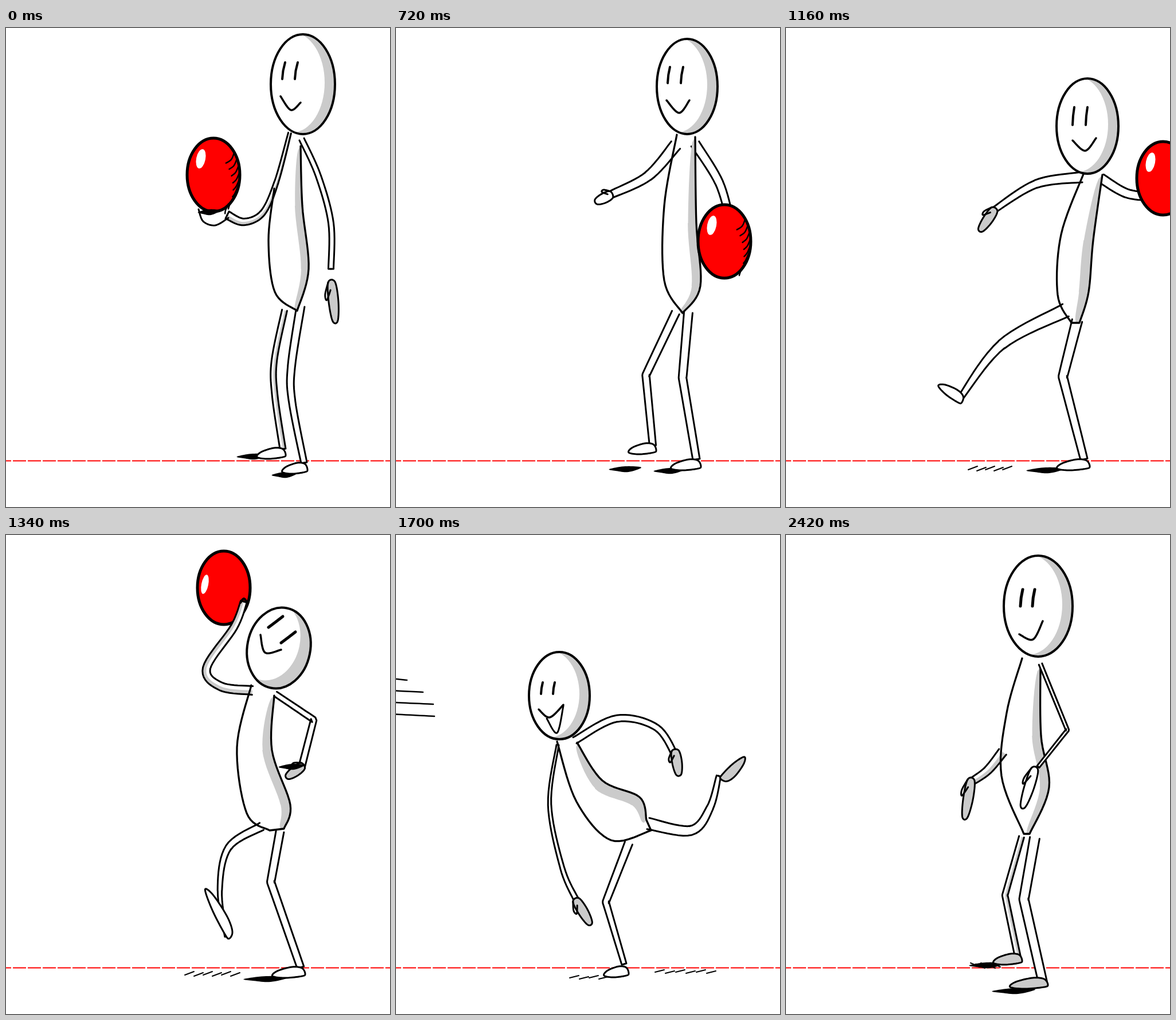
Write an HTML page with a canvas that moves like this. It is 670x835 px and loops after 2900 ms.

```html
<!DOCTYPE html>
<html lang="en">
<head>
<meta charset="utf-8">
<title>Ball throw</title>
<style>
html, body { margin: 0; width: 100%; height: 100%; overflow: hidden; background: #fff; }
canvas { display: block; width: 100%; height: 100%; }
</style>
</head>
<body>
<canvas id="stage" width="670" height="835"></canvas>
<script>
const c = document.getElementById('stage').getContext('2d');
const GRAY = '#cbcbcb', WHITE = '#fff', INK = '#000';
const LOOP = 2900;
c.lineCap = c.lineJoin = 'round';

// "x y x y ..." to points; "!" after a point makes it a corner.
function parse(str) {
  const v = str.split(' '), p = [];
  for (let i = 0; i < v.length; i += 2) {
    const q = [parseFloat(v[i]), parseFloat(v[i + 1])];
    p.push(q);
    if (v[i + 1].endsWith('!')) p.push(q);
  }
  return p;
}

// Points along a smooth curve through p.
function curve(p, closed) {
  const m = p.length, out = [];
  const at = i => closed ? p[(i + m) % m] : p[Math.max(0, Math.min(m - 1, i))];
  for (let i = 0; i < (closed ? m : m - 1); i++) {
    const [a, b, d, e] = [at(i - 1), at(i), at(i + 1), at(i + 2)];
    if (b === d) continue;
    for (let u = 0; u < 1; u += .1) {
      out.push([0, 1].map(k => b[k] + u * (d[k] - a[k] + u * (2 * a[k] - 5 * b[k] + 4 * d[k] - e[k]
        + u * (3 * (b[k] - d[k]) + e[k] - a[k]))) / 2));
    }
  }
  if (!closed) out.push(p[m - 1]);
  return out;
}

function path(pts) {
  c.beginPath();
  pts.forEach(q => c.lineTo(...q));
}
function pen(w = 3) {
  c.lineWidth = w;
  c.strokeStyle = INK;
  c.stroke();
}
function paint(color) {
  c.fillStyle = color;
  c.fill();
}
function line(str, w) {
  path(curve(parse(str)));
  pen(w);
}
function loop(pts, color, w) {
  path(curve(pts, true));
  c.closePath();
  paint(color);
  if (w) pen(w);
}

// Moves local points to x, y, turned by deg.
function place(pts, x, y, deg = 0) {
  const a = deg * Math.PI / 180, s = Math.sin(a), k = Math.cos(a);
  return pts.map(([u, v]) => [x + u * k - v * s, y + u * s + v * k]);
}

// Two ink lines on both sides of a middle line.
function limb(str, w0, w1, shade) {
  const mid = curve(parse(str)), n = mid.length - 1;
  const side = sign => mid.map(([x, y], i) => {
    const a = mid[Math.max(0, i - 1)], b = mid[Math.min(n, i + 1)];
    const dx = b[0] - a[0], dy = b[1] - a[1];
    const r = sign * (w0 + (w1 - w0) * i / n) / 2 / (Math.hypot(dx, dy) || 1);
    return [x - dy * r, y + dx * r];
  });
  const left = side(1), right = side(-1);
  path([...left, ...right.slice().reverse()]);
  paint(WHITE);
  if (shade) {
    path([...mid, ...right.slice().reverse()]);
    paint(GRAY);
  }
  path(left);
  pen();
  path(right);
  pen();
}

function hand(x, y, deg, len, color = GRAY) {
  loop(place([[0, -6], [len / 2, -9], [len, -5], [len, 4], [len / 2, 8], [0, 6]], x, y, deg), color, 3);
  path(curve(place([[0, 6], [len * .3, 13], [len * .45, 11], [len * .2, 3]], x, y, deg)));
  pen();
}

// x, y is the heel, the toe points left before turning.
function foot(x, y, len, deg = 0, color = WHITE) {
  loop(place([[0, -4], [-len * .1, 0], [-len * .6, 3], [-len, 0], [-len * .85, -9], [-len * .4, -16], [-len * .1, -14]],
    x, y, deg), color, 3);
}

// Body between a front and a back outline, shaded along the back.
function torso(front, back, sx, sy = 0) {
  const a = curve(parse(front)), b = curve(parse(back)), n = b.length - 1;
  path([...b, ...b.map(([x, y], i) => {
    const k = Math.sqrt(Math.sin(Math.PI * i / n));
    return [x - sx * k, y + sy * k];
  }).reverse()]);
  paint(GRAY);
  path([...a, ...b.slice().reverse()]);
  pen(3.3);
}

function head(x, y, rx, ry, rot = 0, dy = -3) {
  const oval = (ox, oy) => c.ellipse(x + ox, y + oy, rx, ry, rot, 0, Math.PI * 2);
  c.beginPath();
  oval(0, 0);
  paint(WHITE);
  c.save();
  c.clip();
  c.beginPath();
  c.rect(x - ry, y - ry, ry * 2, ry * 2);
  oval(-18, dy);
  c.fillStyle = GRAY;
  c.fill('evenodd');
  c.restore();
  c.beginPath();
  oval(0, 0);
  pen(4);
}

function face(x, y, slant, len, gap, smile, w = 4) {
  for (const ex of [x, x + gap]) {
    path([[ex, y], [ex + slant * .7, y + len / 2], [ex + slant, y + len]]);
    pen(w);
  }
  line(smile, 3.5);
}

function ball(x, y, hatch, sx = -22, sy = -28, sw = 8) {
  c.beginPath();
  c.ellipse(x, y, 46, 64, 0, 0, Math.PI * 2);
  paint('#f00');
  pen(5);
  c.beginPath();
  c.ellipse(x + sx, y + sy, sw, 17, .2, 0, Math.PI * 2);
  paint(WHITE);
  for (let i = 0; i < hatch; i++) {
    const a = i * .2 - .65, hx = x + 45 * Math.cos(a), hy = y + 62 * Math.sin(a);
    path(curve([[hx, hy], [hx - 5, hy + 11], [hx - 14 + i, hy + 17]]));
    pen(2.5);
  }
}

function blot(x, y, w) {
  loop([[x, y], [x + w / 2, y - 5], [x + w, y - 3], [x + w * .6, y + 5], [x + w * .2, y + 3]], INK);
}
function scribble(x, y, n, step, rise = -6) {
  for (let i = 0; i < n; i++) {
    const sx = x + i * step, sy = y + i % 2 * 2;
    path([[sx, sy], [sx + 16, sy + rise]]);
    pen(2);
  }
}

function floor() {
  c.strokeStyle = '#f00';
  c.lineWidth = 2;
  c.lineCap = 'butt';
  c.setLineDash([23, 3]);
  c.lineDashOffset = 14;
  c.beginPath();
  c.moveTo(0, 754.5);
  c.lineTo(670, 754.5);
  c.stroke();
  c.setLineDash([]);
  c.lineCap = 'round';
}

function present() {
  blot(403, 747, 55);
  blot(464, 779, 44);
  limb('486 492 468 580 469 640 483 734', 9, 10, 1);
  limb('514 485 498 590 499 650 520 758', 14, 10);
  foot(488, 748, 50);
  foot(526, 774, 44);
  limb('495 183 472 268 448 322 415 338 386 326', 5, 14, 1);
  limb('516 194 545 258 567 340 567 420', 9, 9);
  hand(568, 443, 85, 68);
  torso('468 280 458 370 469 460 508 493', '514 206 517 310 528 420 508 493', 14);
  line('336 316 344 337 365 344 388 331');
  ball(362, 256, 9);
  blot(335, 321, 38);
  head(518, 98, 56, 87);
  face(487, 60, -5, 29, 22, '479 119 497 143 514 130');
}

function crouch() {
  blot(398, 745, 80);
  blot(465, 771, 37);
  limb('467 518 441 607! 479 735', 15, 10);
  limb('490 519 478 607! 525 754', 12, 12);
  foot(485, 741, 48, 0, GRAY);
  foot(531, 764, 48, 0, GRAY);
  limb('414 264 400 350 376 388 348 350', 4, 14);
  limb('455 260 505 306 538 350 538 430', 20, 10);
  hand(538, 441, 75, 58, WHITE);
  torso('416 262 411 380 436 480 482 521', '454 262 470 370 506 460 497 518', 12);
  line('301 333 303 354 320 366 343 350');
  ball(329, 277, 8);
  head(429, 177, 56, 83, .05, -9);
  face(401, 135, -6, 25, 20, '390 196 410 215 434 193');
}

function reach() {
  blot(372, 769, 56);
  blot(450, 772, 54);
  limb('488 496 436 605! 448 728', 14, 11);
  limb('510 496 500 610! 524 752', 15, 12);
  foot(454, 740, 48);
  foot(532, 768, 52);
  limb('488 204 440 258 376 290', 20, 12);
  hand(376, 290, 155, 30, WHITE);
  limb('522 202 564 270 584 340', 16, 12);
  torso('490 186 468 310 468 440 500 497', '522 190 524 340 531 450 500 497', 16);
  ball(573, 372, 8);
  head(508, 102, 53, 83);
  face(478, 68, -4, 28, 23, '472 126 494 148 512 126');
}

function windup() {
  blot(336, 772, 44);
  blot(440, 773, 45);
  scribble(388, 774, 2, 10);
  limb('526 500 498 610! 528 754', 18, 8, 1);
  foot(538, 768, 50);
  limb('512 496 465 481 424 485! 409 560 410 625', 17, 3);
  foot(411, 630, 50, 36);
  limb('596 245 525 242 455 268 422 300', 22, 6, 1);
  hand(418, 300, 125, 48);
  limb('628 257 645 282 672 302', 10, 10);
  torso('592 256 530 360 504 460 512 503', '627 260 580 355 553 460 540 500', 22, 4);
  line('600 234 620 240 632 252', 4);
  head(634, 164, 53, 79);
  face(605, 134, 0, 38, 22, '611 200 628 214 648 190');
}

function stride() {
  blot(420, 771, 66);
  scribble(318, 770, 5, 15);
  limb('508 510 483 608! 520 752', 18, 12);
  foot(530, 768, 57);
  limb('488 492 376 552 302 648', 24, 8);
  foot(304, 656, 50, 40);
  limb('516 260 436 272 362 318', 18, 9);
  hand(364, 316, 125, 44);
  limb('550 262 594 288 640 294', 16, 14);
  torso('520 252 480 360 474 465 498 514', '552 256 536 370 528 460 512 514', 18);
  ball(658, 262, 0);
  head(526, 171, 54, 83);
  face(503, 138, -3, 31, 23, '500 196 522 214 541 192');
}

function cock() {
  blot(415, 774, 78);
  scribble(312, 767, 6, 16);
  limb('478 517 462 605! 514 754', 14, 12);
  foot(522, 769, 57);
  limb('446 508 388 545 373 620 384 700', 14, 4);
  foot(386, 705, 95, 66);
  ball(380, 92, 0, -33, -6, 6);
  limb('430 271 375 264 350 232 398 160 415 116', 15, 11, 1);
  line('409 118 415 111 421 118', 4);
  limb('470 277 537 322! 516 404', 9, 11);
  hand(518, 402, 145, 34);
  blot(476, 404, 45);
  torso('428 262 403 370 420 485 460 515', '468 280 464 375 496 470 485 512', 18);
  head(476, 197, 55, 71, .2, -14);
  for (const [x, y] of [[458, 161], [480, 188]]) {
    path([[x, y], [x + 12, y - 9], [x + 25, y - 19]]);
    pen(5);
  }
  line('444 174 452 205 480 200', 3.5);
}

function release() {
  blot(270, 771, 60);
  scribble(450, 763, 5, 18);
  for (let i = 0; i < 4; i++) line(`40 ${246 + i * 23} ${150 + i % 3 * 18} ${250 + i * 22}`, 2.5);
  ball(24, 284, 5);
  limb('418 512 340 636! 364 746', 18, 12);
  foot(376, 768, 52);
  limb('444 504 490 600 530 704', 22, 14);
  foot(526, 704, 62, -105, GRAY);
  limb('352 308 315 316 236 299', 16, 12);
  hand(238, 299, 190, 40, WHITE);
  limb('388 295 450 318 490 362', 14, 10);
  hand(490, 360, 80, 46);
  torso('356 300 376 420 416 510 436 516', '386 294 424 400 454 490 436 516', 20);
  head(346, 215, 53, 81);
  face(322, 180, -4, 22, 22, '312 230 340 240 358 224');
  line('326 246 340 266 357 230');
}

function follow() {
  scribble(303, 772, 4, 17, -4);
  scribble(452, 762, 6, 18, -4);
  [19, 47, 65, 67].forEach((x, i) => line(`0 ${251 + i * 20.5} ${x} ${253 + i * 21}`, 2.5));
  limb('406 537 366 640! 398 748', 14, 8);
  foot(406, 768, 43);
  limb('440 503 515 515 548 475 563 420', 20, 7);
  foot(564, 422, 56, 141, GRAY);
  limb('282 366 268 470 290 580 314 635', 4, 9);
  hand(314, 636, 60, 48);
  limb('312 358 385 320 455 336 490 390', 12, 10);
  hand(487, 376, 82, 42);
  torso('281 360 315 465 375 532 445 515', '316 362 360 428 425 457 437 497', 14, 15);
  head(285, 280, 53, 76);
  face(256, 257, -3, 20, 21, '249 304 268 318 292 296');
  line('263 320 281 345 292 298');
}

function bow() {
  blot(305, 768, 65);
  scribble(460, 762, 6, 18, -4);
  limb('404 535 368 636! 396 746', 16, 9);
  foot(407, 768, 45);
  limb('438 503 510 526 562 490', 22, 10);
  foot(562, 492, 56, 130, GRAY);
  limb('256 380 240 500 268 616', 5, 12);
  hand(268, 616, 65, 56);
  limb('290 368 380 344 440 402', 14, 10);
  hand(440, 402, 85, 42);
  torso('254 376 304 478 378 532 440 514', '282 370 350 418 428 464 438 492', 14, 15);
  head(240, 297, 54, 80);
  face(208, 282, -1, 20, 22, '208 334 230 346 248 318');
}

function recover() {
  blot(306, 765, 65);
  scribble(503, 758, 5, 18, 6);
  limb('400 522 376 605! 409 748', 9, 12);
  foot(417, 764, 50);
  limb('433 512 465 605 505 622 548 608', 6, 18);
  foot(550, 586, 70, -104, GRAY);
  limb('356 272 367 360 348 416 300 422', 4, 16);
  hand(298, 425, 105, 58);
  limb('385 238 470 280 489 340 493 390', 12, 15, 1);
  hand(498, 387, 60, 36);
  torso('358 270 379 360 373 465 396 519', '400 250 441 355 445 450 432 513', 16);
  head(322, 199, 54, 83, -.05);
  face(290, 215, 7, 28, 23, '306 257 322 269 338 247', 5);
}

function settle() {
  blot(308, 764, 64);
  scribble(500, 760, 4, 17, 5);
  limb('406 518 381 616! 411 748', 12, 11);
  foot(418, 766, 52);
  limb('434 508 466 602 542 698', 14, 16);
  foot(536, 700, 48, -130, GRAY);
  limb('382 270 374 360 306 411', 8, 16);
  hand(304, 410, 118, 52);
  limb('424 236 472 305 474 384', 14, 12);
  hand(474, 384, 88, 46);
  torso('384 228 374 360 378 476 414 518', '424 228 444 345 446 480 414 518', 17);
  head(400, 142, 57, 86);
  face(373, 126, -2, 28, 24, '368 186 388 200 408 174', 5);
}

function rest() {
  blot(320, 750, 60);
  blot(360, 795, 75);
  scribble(322, 746, 5, 9, 7);
  limb('411 526 382 628! 405 738', 9, 10, 1);
  limb('434 528 415 635! 448 780', 17, 15);
  foot(412, 746, 50, 0, GRAY);
  foot(457, 788, 66, 0, GRAY);
  limb('378 378 352 410 324 430', 16, 12, 1);
  hand(323, 427, 100, 66);
  torso('412 215 385 310 376 420 415 521', '444 230 445 350 459 440 425 521', 17);
  limb('444 225 491 340! 440 404', 6, 5);
  hand(434, 408, 108, 68, WHITE);
  head(440, 124, 60, 88);
  face(413, 95, -4, 29, 21, '407 173 431 182 448 150', 5);
}

const scenes = [
  [0, present], [500, crouch], [720, reach], [940, windup],
  [1160, stride], [1340, cock], [1520, release], [1700, follow],
  [1880, bow], [2060, recover], [2240, settle], [2420, rest]
];

const start = performance.now();
function frame() {
  const t = (performance.now() - start) % LOOP;
  c.fillStyle = WHITE;
  c.fillRect(0, 0, 670, 835);
  floor();
  scenes.filter(s => s[0] <= t).pop()[1]();
  requestAnimationFrame(frame);
}
frame();
</script>
</body>
</html>
```
